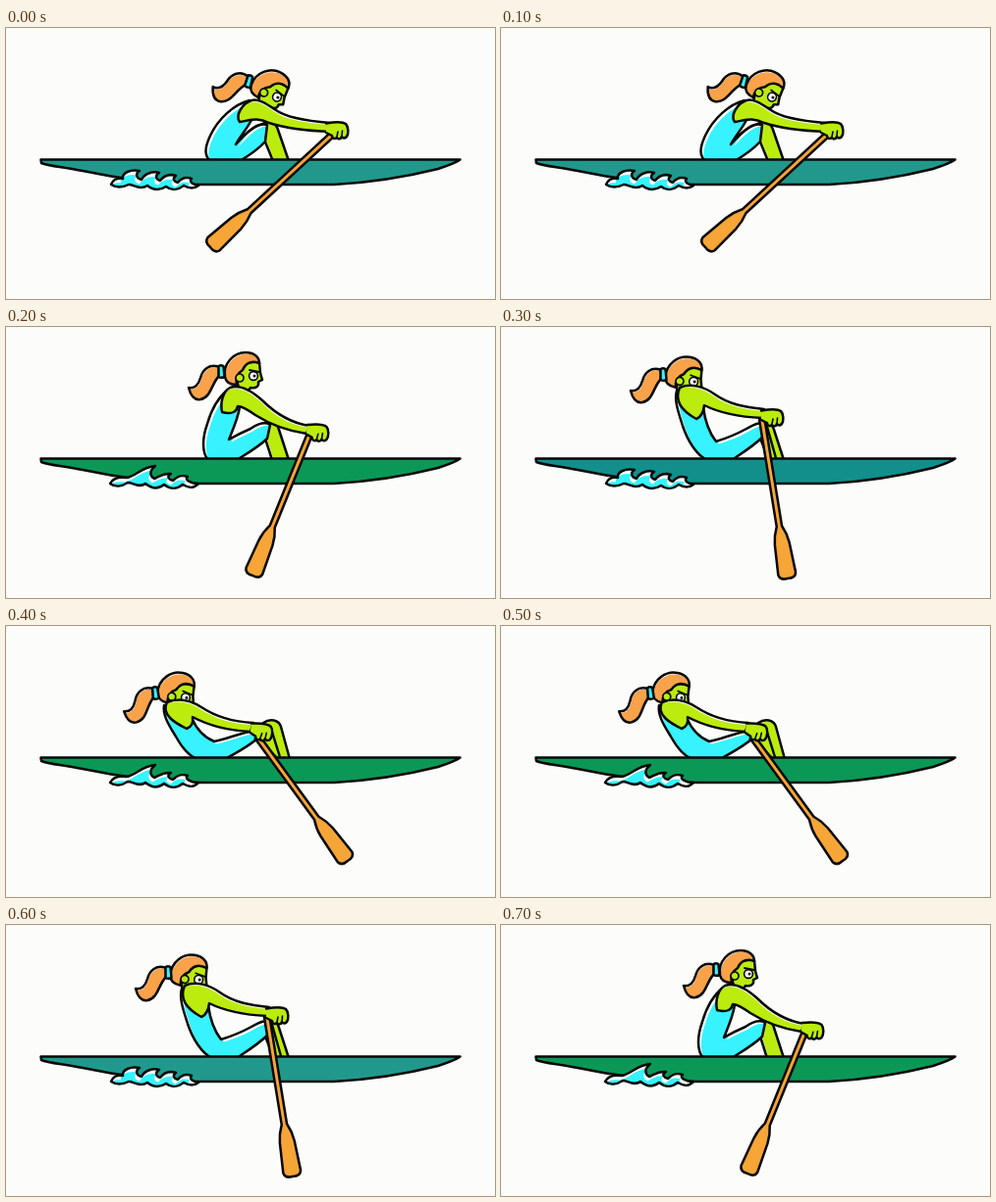
An HTML page with a canvas for the animation above (0.8 s loop, 498x277 px).

```html
<!DOCTYPE html>
<html lang="en">
<head>
<meta charset="utf-8">
<title>Rower</title>
<style>
html, body { margin: 0; width: 100%; height: 100%; overflow: hidden; background: #fcfcfb; }
canvas { display: block; width: 498px; height: 277px; }
</style>
</head>
<body>
<canvas id="stage"></canvas>
<script>
const W = 498, H = 277, STEP = 100;
const PAPER = '#fcfcfb', INK = '#080808', SKIN = '#bbec0e', SUIT = '#36f3ff', HAIR = '#f9a24a', WOOD = '#f6a537';
const TEAL = '#20998c', GREEN = '#0b9857';

const canvas = document.getElementById('stage');
const ctx = canvas.getContext('2d');
const scale = window.devicePixelRatio || 1;
canvas.width = W * scale;
canvas.height = H * scale;

const path = d => new Path2D(d);
const rad = deg => deg * Math.PI / 180;

const hull = path('M35.5 134.5 H462.5 C458 138 449 141 440 144 C404 153 372 158 334 160 H192 C150 159 111 153 78 146 C58 142 43 141 36 138 Z');

const waves = [
  path('M107 160 C109 155 113 153 119 154 C118 148 127 144 136 146 C131 149 133 154 138 155 C141 149 149 146 156 148 C151 151 153 155 157 156 C161 151 167 149 173 151 C169 154 171 157 175 158 C179 153 184 152 189 154 C186 157 190 160 196 161 C191 165 186 164 181 161 C176 165 169 167 163 162 C157 166 150 166 144 161 C137 166 130 160 125 160 C119 163 113 164 107 160 Z'),
  path('M106 160 C109 154 116 153 123 154 C132 153 138 143 152 142 C146 147 146 152 151 155 C156 153 160 149 168 150 C163 153 166 156 170 157 C175 152 179 151 185 153 C181 156 188 160 196 160 C191 165 187 165 180 161 C174 166 167 166 161 161 C155 166 148 165 142 160 C136 165 129 159 124 159 C118 163 111 164 106 160 Z')
];

// Head, ponytail and fist are drawn around their own origins.
const face = path('M-6 8 C-8 0 0 -12 17 -10 L18 1 L20 8 L16 10 C17 15 13 17 8 16 L4 22 L-3 20 Z');
const hair = path('M-18 5 C-20 -9 -9 -20 3 -20 C11 -20 17 -16 17 -9 C9 -12 3 -9 0 -2 C-5 1 -8 5 -6 13 C-13 13 -17 11 -18 5 Z');
const tail = path('M-2 -5 C-12 -9 -19 -2 -21 6 C-23 13 -27 17 -33 16 C-31 24 -27 29 -21 28 C-10 26 -10 12 -2 4 Z');
const tie = path('M-2.5 -6 Q0 -7.5 2.5 -6 L3.5 5 Q0 6.5 -2.5 5 Z');
const fist = path('M-7 -6.5 C1 -8 9 -9 13 -6 C16 -3 16 4 14 7 C12 9 10 9 9 7 C8 10 5 10 4 8 C2 10 -1 9 -1 6 L-7 3');

const poses = {
  catch: {
    head: [268, 62, 27], tie: [247, 55, 18], fist: [333, 104, 0],
    oar: [331, 110, 208, 224],
    suit: path('M248 74 C232 78 216 93 208 110 C202 123 202 130 208 136 L238 136 C248 130 257 124 264 116 L266 99 C258 96 248 103 234 119 C239 110 246 102 250 94 Z'),
    shin: path('M261 98 C268 94 275 97 277 104 L288 136 H272 L263 114 Z'),
    arm: path('M250 74 C258 72 266 78 275 84 C286 92 306 95 330 97 L331 106 C306 105 286 103 268 97 C256 91 250 94 238 96 C233 89 241 77 250 74 Z')
  },
  drive: {
    head: [241, 46, 0], tie: [219, 46, 0], fist: [313, 107, 4],
    oar: [310, 108, 251, 254],
    suit: path('M226 64 C216 72 209 85 205 99 C200 113 199 128 206 136 L235 136 C246 129 258 122 266 114 L269 100 C263 96 255 100 249 104 C242 107 234 111 227 115 C231 105 236 94 238 82 Z'),
    shin: path('M263 99 C270 95 276 98 278 105 L288 136 H271 L264 114 Z'),
    arm: path('M228 62 C239 58 251 66 261 75 C274 88 289 98 309 101 L306 109 C286 106 268 99 254 90 C247 85 241 81 236 81 C235 86 231 90 220 87 C218 77 221 66 228 62 Z')
  },
  pull: {
    head: [186, 50, 10], tie: [165, 49, 0], fist: [272, 92, 0],
    oar: [266, 96, 292, 257],
    suit: path('M179 65 C176 75 181 88 185 101 C190 116 199 131 210 136 L235 136 C247 128 258 121 267 112 L270 101 C266 95 257 100 250 104 C239 110 229 114 219 117 C212 108 208 98 206 82 Z'),
    shin: path('M264 99 C270 95 276 98 278 105 L288 136 H273 L264 114 Z M271 102 L280 134'),
    arm: path('M182 62 C193 57 207 61 218 69 C232 79 248 82 268 84 L266 93 C245 92 225 89 207 80 C206 88 204 92 199 94 C188 88 175 78 182 62 Z')
  },
  finish: {
    head: [173, 67, 12], tie: [152, 69, -4], fist: [256, 107, 8],
    oar: [257, 115, 348, 240],
    suit: path('M161 81 C159 91 167 103 173 113 C179 124 186 133 195 136 L223 136 C236 129 247 123 256 115 L254 107 C239 109 226 115 212 118 C202 114 194 105 189 94 Z'),
    shin: path('M262 99 C269 94 278 96 280 103 L289 136 H277 L258 117 Z M269 102 L279 134'),
    arm: path('M164 78 C176 73 188 76 199 83 C214 93 231 98 252 99 L249 108 C227 107 207 102 190 93 C191 99 189 103 184 105 C174 100 157 91 164 78 Z')
  }
};

const cycle = [
  ['catch', 0, TEAL], ['catch', 0, TEAL], ['drive', 1, GREEN], ['pull', 0, '#128f8b'],
  ['finish', 1, GREEN], ['finish', 1, GREEN], ['pull', 0, TEAL], ['drive', 1, GREEN]
];

function outline(p, width = 2.5) {
  ctx.strokeStyle = INK;
  ctx.lineWidth = width;
  ctx.stroke(p);
}

function solid(p, color) {
  ctx.fillStyle = color;
  ctx.fill(p);
  outline(p);
}

// The colour sits slightly off its outline, leaving a white rim.
function rimmed(p, color, dx, dy) {
  ctx.save();
  ctx.clip(p);
  ctx.fillStyle = '#fff';
  ctx.fill(p);
  ctx.translate(dx, dy);
  ctx.fillStyle = color;
  ctx.fill(p);
  ctx.restore();
  outline(p);
}

function at([x, y, deg], draw) {
  ctx.save();
  ctx.translate(x, y);
  ctx.rotate(rad(deg));
  draw();
  ctx.restore();
}

function disc(x, y, r, color, line) {
  const p = new Path2D();
  p.arc(x, y, r, 0, Math.PI * 2);
  ctx.fillStyle = color;
  ctx.fill(p);
  if (line) outline(p, line);
}

function drawHead() {
  solid(face, SKIN);
  rimmed(hair, HAIR, 1.2, 1.6);
  disc(-3, 6, 4, SKIN, 1.7);
  disc(11, 4, 4.4, '#fff', 1.6);
  disc(12, 4, 1.5, INK);
  outline(path('M7 -2 L17 0'), 1.8);
}

function drawOar([x, y, tx, ty]) {
  const len = Math.hypot(tx - x, ty - y), neck = len - 54;
  at([x, y, Math.atan2(ty - y, tx - x) * 180 / Math.PI], () => {
    solid(path(`M-2 -2.7 H${neck} C${neck + 5} -5 ${neck + 12} -7 ${neck + 18} -7.5 L${len - 5} -9 Q${len + 1} -8 ${len} 0 Q${len + 1} 8 ${len - 5} 9 L${neck + 18} 7.5 C${neck + 12} 7 ${neck + 5} 5 ${neck} 2.7 H-2 Z`), WOOD);
  });
}

function drawFist() {
  solid(fist, SKIN);
  outline(path('M4 7 L5 2 M9 7 L9.5 1'), 1.6);
}

function render(time) {
  const [name, wave, color] = cycle[Math.floor(time / STEP) % cycle.length];
  const pose = poses[name];
  ctx.setTransform(scale, 0, 0, scale, 0, 0);
  ctx.fillStyle = PAPER;
  ctx.fillRect(0, 0, W, H);
  ctx.lineJoin = ctx.lineCap = 'round';

  rimmed(pose.shin, SKIN, 2, 1);
  rimmed(pose.suit, SUIT, 2.8, 2.5);
  at(pose.tie, () => rimmed(tail, HAIR, 1, 1.5));
  at(pose.head, drawHead);
  at(pose.tie, () => solid(tie, SUIT));
  rimmed(pose.arm, SKIN, -1, 2);
  solid(hull, color);
  rimmed(waves[wave], SUIT, -2, 4.5);
  drawOar(pose.oar);
  at(pose.fist, drawFist);
}

const start = performance.now();
function tick() {
  render(performance.now() - start);
  requestAnimationFrame(tick);
}
tick();
</script>
</body>
</html>
```
